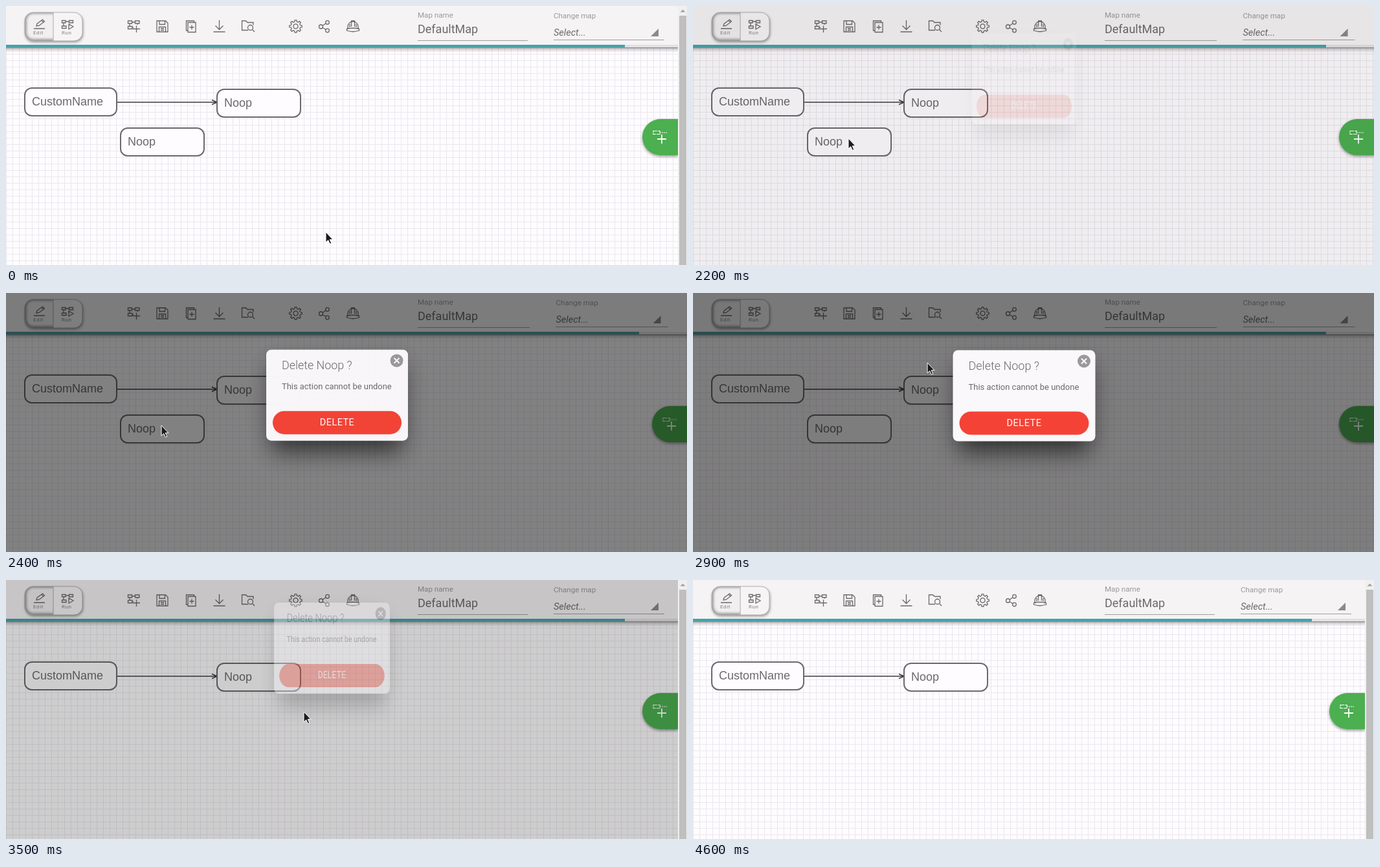
Recreate the animation shown at these times as an HTML page. Size 1052 by 401 pixels, loop 5000 ms.

```html
<!DOCTYPE html>
<html lang="en">
<head>
<meta charset="utf-8">
<title>Map editor</title>
<style>
  html, body { margin: 0; width: 100%; height: 100%; overflow: hidden; background: #fefcfe; }
  svg { display: block; width: 100%; height: 100%; }
  text { font-family: Roboto, sans-serif; fill: #6b696b; }
  .node rect { fill: #fefcfe; stroke: #6b696b; stroke-width: 2; }
  .node text { font: 18px "Liberation Sans", Arial, sans-serif; }
  .icon { fill: none; stroke: #6b696b; stroke-width: 1.3; }
  .white { fill: none; stroke: #fff; stroke-width: 1.2; }
  .label { font-size: 11.6px; fill: #9a989a; }
  .tiny { font-size: 8px; letter-spacing: .6px; fill: #858385; }
  .rule { stroke: #a09ea0; }
</style>
</head>
<body>
<svg viewBox="0 0 1052 401">
  <defs>
    <pattern id="grid" width="10" height="10" y="4" patternUnits="userSpaceOnUse">
      <path d="M0 .5H10M.5 0V10" stroke="#ebe8ee" fill="none"/>
    </pattern>
    <linearGradient id="fade" x2="0" y2="1">
      <stop offset="0" stop-opacity=".42"/>
      <stop offset=".35" stop-opacity=".16"/>
      <stop offset="1" stop-opacity="0"/>
    </linearGradient>
    <filter id="soft" x="-30%" y="-30%" width="160%" height="160%"><feGaussianBlur stdDeviation="2"/></filter>
    <filter id="deep" x="-60%" y="-90%" width="220%" height="280%"><feGaussianBlur stdDeviation="18"/></filter>
    <clipPath id="editClip"><path d="M73 10H42a13 13 0 0 0-13 13V41a13 13 0 0 0 13 13H73Z"/></clipPath>
    <path id="gear"/>
  </defs>

  <rect width="1052" height="401" fill="#fefcfe"/>
  <rect y="64" width="1052" height="337" fill="url(#grid)"/>

  <path d="M172 149H326M318 145.500L326.500 149L318 152.500" fill="none" stroke="#3d3b40" stroke-width="1.4"/>
  <g class="node"><rect x="29" y="127" width="142" height="43" rx="11"/><text x="40" y="154">CustomName</text></g>
  <g class="node"><rect x="326" y="129" width="129" height="43" rx="11"/><text x="337" y="156">Noop</text></g>
  <g class="node" id="spare"><rect x="177" y="189" width="129" height="43" rx="11"/><text x="188" y="216">Noop</text></g>
  <g id="hover">
    <path d="M182 230H302V231a5 5 0 0 1-5 5H187a5 5 0 0 1-5-5Z" fill="#ef5a2c"/>
    <rect x="176" y="188" width="131" height="45" rx="12" fill="#6e6c6e"/>
    <use href="#gear" class="white" transform="translate(201 211) scale(.83)"/>
    <g class="white"><path d="M234 206H248M238.500 206V203.500H243.500V206M235.500 206L236.500 219.500H245.500L246.500 206M239 209V216.500M241 209V216.500M243 209V216.500"/></g>
    <path id="pull" d="M258 235L300 244" stroke="#ef5a2c" stroke-width="1.2"/>
  </g>

  <g id="add">
    <path d="M1038 177H1011a28 28 0 0 0 0 56H1038Z" filter="url(#soft)" opacity=".4"/>
    <path d="M1039 175H1011a28 28 0 0 0 0 56H1039Z" fill="#4caf50"/>
    <g class="white" stroke-width="1.500">
      <rect x="1000" y="193.500" width="10" height="5" stroke-dasharray="6 1"/>
      <path d="M1010 196H1021" stroke-dasharray="2 1"/>
      <path d="M1013 199V213M1006 206H1020" stroke-width="1.800"/>
    </g>
  </g>

  <rect width="1052" height="60.500" fill="#f5f3f4"/>
  <rect y="60" width="1052" height="4" fill="#e3e1e3"/>
  <rect id="bar" y="60" height="4" fill="#48a2a8"/>
  <rect y="64" width="1052" height="8" fill="url(#fade)"/>

  <rect x="30" y="12" width="89" height="44" rx="13" filter="url(#soft)" opacity=".4"/>
  <rect x="29" y="10" width="89" height="44" rx="13" fill="#f6f4f5"/>
  <g clip-path="url(#editClip)">
    <rect x="29" y="10" width="44" height="44" fill="#f1eff0"/>
    <path d="M75 9H42a13 13 0 0 0-13 13V41a13 13 0 0 0 13 13H75" fill="none" stroke="#000" stroke-width="4" opacity=".5" filter="url(#soft)"/>
  </g>
  <path d="M73 10V54" stroke="#aaa8aa"/>
  <rect x="29" y="10" width="89" height="44" rx="13" fill="none" stroke="#a5a3a5" stroke-width=".8"/>
  <g class="icon" stroke-width="1.100">
    <path d="M47 31L48 27.500L56.500 21L59.500 24L51 30.500ZM43 35H60M55 22.500L58 25.500"/>
    <path d="M86.500 22.500H92V26H86.500ZM97.500 22.500H103.500V26H97.500ZM92 24H97.500M89 26V31M86.500 31H93V34.500H86.500ZM97 28L104 32L97 36Z"/>
  </g>
  <text class="tiny" x="42" y="44">Edit</text>
  <text class="tiny" x="86" y="44">Run</text>

  <g class="icon">
    <path d="M188.500 23H194.500V27H188.500ZM199.500 23H206V27H199.500ZM194.500 25H199.500M203 27V29M191 27V31.500M188.500 31.500H195V35.500H188.500ZM195 33.500H197M201.500 30.500V41M196 35.500H207"/>
    <path d="M233 23H246.500L250 26.500V40H233ZM237 23V28.500H245.500V23M236.500 40V32.500H246.500V40M239 35H244M239 37.500H244"/>
    <path d="M281 25.500H293V40.500H281ZM281 38H278.500V23H290.500V25.500M287 29.500V36.500M283.500 33H290.500"/>
    <path d="M329.500 22V36M323.500 30.500L329.500 36.500L335.500 30.500M320.500 40H338.500"/>
    <path d="M374 37.500H364.500V23H370.500L373 25.500H382V29.500M380.500 36.500L384 40"/><circle cx="377.500" cy="33.500" r="4"/>
    <use href="#gear" transform="translate(447.500 31.500)"/>
    <circle cx="486.500" cy="32" r="3"/><circle cx="496.500" cy="25.500" r="2.800"/><circle cx="496.500" cy="38" r="2.800"/>
    <path d="M489 30.500L494 27M489 33.500L494 36.500"/>
    <path d="M528 35V32a8 8 0 0 1 16 0V35M533.500 32V23H538.500V32M526.500 35.500Q536 33 545.500 35.500V38Q536 41.500 526.500 38ZM531 33V28M541 33V28"/>
  </g>

  <text class="label" x="636" y="18">Map name</text>
  <text x="636" y="42" font-size="18">DefaultMap</text>
  <path class="rule" id="nameRule"/>
  <g id="select">
    <text class="label" x="846" y="19">Change map</text>
    <text x="846" y="46" font-size="14.500" font-style="italic">Select...</text>
    <path d="M996 47H1008V35Z" fill="#8b898b"/>
    <path class="rule" id="selectRule"/>
  </g>

  <rect id="shade" width="1052" height="401"/>

  <g id="scroll">
    <rect x="1038" width="14" height="401" fill="#f1f0f1"/>
    <path d="M1041.500 9.500L1045.500 5.500L1049.500 9.500Z" fill="#a3a2a3"/>
    <rect x="1040" y="15" width="11" height="386" fill="#c0bfc0"/>
  </g>

  <g id="dialog">
    <rect x="-102" y="22" width="204" height="136" rx="8" filter="url(#deep)" opacity=".6"/>
    <rect x="-110" width="220" height="141" rx="8" fill="#faf8fb"/>
    <text x="-86" y="30" font-size="18" font-weight="300">Delete Noop ?</text>
    <text x="-86" y="61" font-size="13">This action cannot be undone</text>
    <circle cx="92.500" cy="17" r="10" fill="#9b999b"/>
    <path d="M88.500 13L96.500 21M96.500 13L88.500 21" stroke="#fff" stroke-width="2"/>
    <rect id="confirm" x="-100" y="95" width="200" height="36" rx="18"/>
    <text y="117" font-size="14.500" letter-spacing=".5" text-anchor="middle" style="fill:#fff">DELETE</text>
  </g>

  <g id="cursor" stroke-linejoin="round">
    <path id="arrow" d="M0 0V16L3.700 12.600L6.300 18.300L8.800 17.200L6.200 11.700H11Z" fill="#1c1a1d" stroke="#fff"/>
    <g id="move">
      <path d="M0-9L4-4.500H1.500V-1.500H4.500V-4L9 0L4.500 4V1.500H1.500V4.500H4L0 9L-4 4.500H-1.500V1.500H-4.500V4L-9 0L-4.500-4V-1.500H-1.500V-4.500H-4Z" fill="#1c1a1d" stroke="#fff"/>
      <circle r="2.200" fill="#1c1a1d" stroke="#fff"/>
    </g>
    <path id="hand" d="M-1.500 1Q0-1.500 1.500 1V6Q3 4.500 4.500 6.300Q6 5.200 7.500 7Q9.500 6 10.500 8V12L8.500 16H0L-5 9.500Q-5.500 7-3.300 7.600L-1.500 9.500Z" fill="#fff" stroke="#1c1a1d" stroke-width="1.200"/>
  </g>
</svg>

<script>
const LOOP = 5000, STEP = 100;
const $ = id => document.getElementById(id);
const show = (id, on) => $(id).setAttribute('display', on ? 'inline' : 'none');
const set = (id, attrs) => Object.entries(attrs).forEach(([k, v]) => $(id).setAttribute(k, v));
const mix = (a, b, p) => a + (b - a) * p;

// pointer stops: time, x, y and, where it changes, the shape
const stops = [
  [0, 494, 350, 'arrow'], [500, 493, 349], [700, 474, 339], [800, 436, 318], [900, 388, 291], [1000, 343, 267],
  [1100, 304, 246, 'move'], [1200, 281, 230], [1300, 269, 221], [1700, 273, 225], [1800, 256, 215],
  [1900, 239, 205, 'hand'], [2100, 240, 205, 'arrow'], [2500, 243, 205], [2600, 252, 203],
  [2700, 276, 182], [2800, 316, 140], [2900, 362, 108], [3000, 408, 102], [3100, 444, 148],
  [3200, 460, 203, 'hand'], [3500, 460, 204, 'arrow'], [4000, 450, 216], [4100, 398, 220],
  [4200, 300, 168], [4300, 196, 90], [4400, 118, 34], [4500, 82, 10], [4600, 0, 0, 'none']
];

function easeInOut(p) {
  p = Math.min(1, Math.max(0, p));
  return p < .5 ? 2 * p * p : 1 - 2 * (1 - p) ** 2;
}

function gearPath(teeth) {
  const pts = [];
  for (let i = 0; i < teeth; i++) {
    for (const [r, off] of [[7.4, -.30], [9.8, -.18], [9.8, .18], [7.4, .30]]) {
      const a = (i + off) / teeth * 2 * Math.PI;
      pts.push((r * Math.sin(a)).toFixed(2) + ' ' + (-r * Math.cos(a)).toFixed(2));
    }
  }
  return 'M' + pts.join('L') + 'ZM3.600 0A3.600 3.600 0 1 1-3.600 0A3.600 3.600 0 1 1 3.600 0Z';
}

function drawCursor(t) {
  let shape, pos;
  for (const s of stops) {
    if (s[0] > t) break;
    pos = s;
    shape = s[3] || shape;
  }
  set('cursor', { transform: `translate(${pos[1]} ${pos[2]})` });
  ['arrow', 'move', 'hand'].forEach(id => show(id, id === shape));
}

function drawPage(t) {
  const wide = t >= 2100 && t < 3400;
  show('scroll', !wide);
  set('bar', { width: wide ? 978 : 956 });
  set('nameRule', { d: `M636 53.500H${wide ? 809 : 806}` });
  set('select', { transform: `translate(${wide ? 3.5 : 0} 0)` });
  set('selectRule', { d: `M846 52.500H${wide ? 1019 : 1017}` });
  set('add', { transform: `translate(${wide ? 15 : 0} 0)` });
  show('spare', t < 3400);
  show('hover', t >= 1100 && t < 2100);
  show('pull', t < 1200);
}

function drawDialog(t) {
  const closing = t >= 3300;
  const p = closing ? 1 - easeInOut((t - 3330) / 300) : easeInOut((t - 2127) / 300);
  const x = t >= 3400 ? 503.5 : 511.5;
  const y = mix(closing ? 3 : 36, 88.5, p);
  show('dialog', p > 0);
  set('dialog', { opacity: p, transform: `translate(${x} ${y}) scale(${mix(.7, 1, p)} 1)` });
  set('shade', { opacity: p / 2 });
  set('confirm', { fill: t >= 3200 ? '#f5574a' : '#f44336' });
}

function draw(now) {
  const t = Math.floor(now % LOOP / STEP) * STEP;
  drawPage(t);
  drawDialog(t);
  drawCursor(t);
}

set('gear', { d: gearPath(8) });
const start = performance.now();
function tick() {
  draw(performance.now() - start);
  requestAnimationFrame(tick);
}
tick();
</script>
</body>
</html>
```
